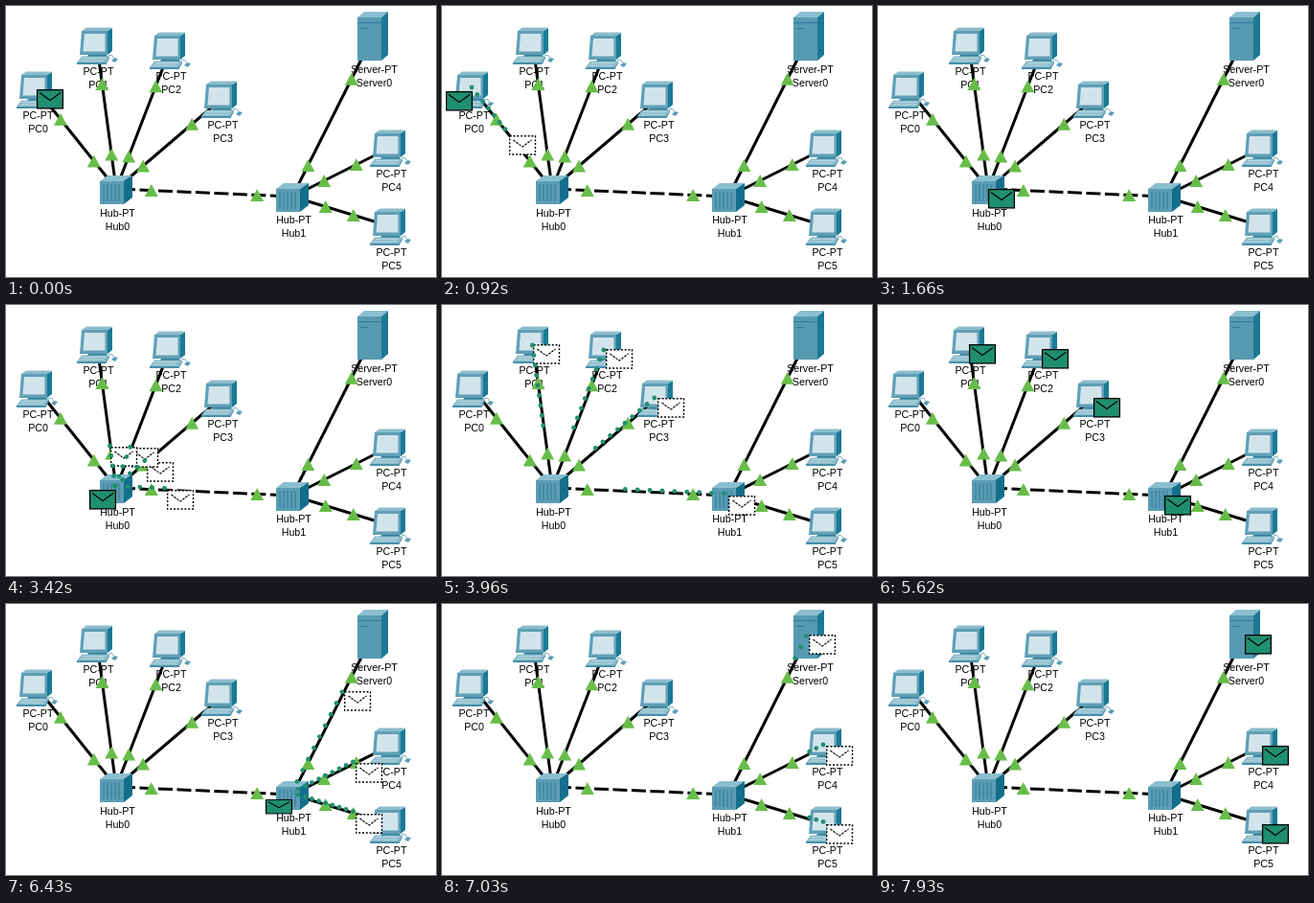
Write an HTML page that moves like this. It is 449 px wide and 283 px high and loops after 8 s.

```html
<!DOCTYPE html>
<html lang="en">
<head>
<meta charset="utf-8">
<title>Hub broadcast</title>
<style>
html, body { margin: 0; width: 100%; height: 100%; overflow: hidden; background: #fff; }
svg { display: block; width: 449px; height: 283px; }
text { font: 10.67px "Liberation Sans", Arial, sans-serif; text-anchor: middle; fill: #000; }
</style>
</head>
<body>
<svg viewBox="0 0 449 283">
  <defs>
    <g id="pc">
      <path d="M12 11Q17 9 17 13" fill="none" stroke="#6fa9bd"/>
      <path d="M15 16L18 13L22 14L19 18Z" fill="#5a9db5"/>
      <path d="M-8 8H9L11 12H-10Z" fill="#2b7f99"/>
      <path d="M-21 18L-16 11.500H13L9 18Z" fill="#8dbccc"/>
      <path d="M-21 18H9L13 11.500V13.500L9.500 20H-21Z" fill="#4690aa"/>
      <path d="M-17 16H7M-15 13.500H9" stroke="#b9d8e2"/>
      <path d="M11 -15L16 -18V6L11 10Z" fill="#1a7a96"/>
      <path d="M-16 -15L-11 -18.500H16L11 -15Z" fill="#8bbccb"/>
      <path d="M-16 -15H11V10H-18Z" fill="#5f9fb6"/>
      <path d="M-13 -12H8.500V6.500H-14.500Z" fill="#d2e4eb"/>
    </g>
    <g id="hub">
      <path d="M-17 -8L-9 -14H17L8 -8Z" fill="#8abfd0"/>
      <path d="M8 -8L17 -14V9L8 16Z" fill="#146f8c"/>
      <rect x="-17" y="-8" width="25" height="24" fill="#5c9db5"/>
      <path d="M-13 -5V13M-9 -5V13M-5 -5V13M-1 -5V13M3 -5V13" stroke="#2e7a94"/>
    </g>
    <g id="server">
      <path d="M-16 -20L-9 -26H16L9 -20Z" fill="#8abfd0"/>
      <path d="M9 -20L16 -26V19L9 25Z" fill="#1d7893"/>
      <rect x="-16" y="-20" width="25" height="45" fill="#569ab1"/>
      <path d="M-16 -14.500H9M-13 -8.500H-5" stroke="#2e7a94"/>
    </g>
    <g id="mail" stroke="#000">
      <rect x=".6" y=".6" width="26.800" height="19.300" fill="#1f8f70" stroke-width="1.300"/>
      <path d="M3 3.500L14 11.500L25 3.500" fill="none" stroke-width="1.200"/>
    </g>
    <g id="ghost" stroke="#000" fill="#fff">
      <rect x=".7" y=".7" width="26.800" height="19.300" stroke-width="1.400" stroke-dasharray="2 1.800"/>
      <path d="M4.500 5L14 12L23.500 5" fill="none" stroke-width="1.200" stroke-dasharray="2.500 1.200"/>
    </g>
    <g id="cross" fill="none" stroke-linecap="round">
      <path d="M5.500 4Q12 8 16.500 13.500M17 3.500Q10 7 6 13.500" stroke="#200" stroke-width="5"/>
      <path d="M5.500 4Q12 8 16.500 13.500M17 3.500Q10 7 6 13.500" stroke="#f4502a" stroke-width="3.200"/>
    </g>
  </defs>
  <g id="scene"></g>
  <g id="traffic"></g>
</svg>
<script>
const LOOP = 8000;

// name: [icon, x, y, label offset, model]
const nodes = {
  PC0: ['pc', 32, 87, 31, 'PC-PT'],
  PC1: ['pc', 95, 41, 31, 'PC-PT'],
  PC2: ['pc', 171, 46, 31, 'PC-PT'],
  PC3: ['pc', 225, 97, 31, 'PC-PT'],
  PC4: ['pc', 401, 148, 31, 'PC-PT'],
  PC5: ['pc', 401, 230, 31, 'PC-PT'],
  Server0: ['server', 383, 32, 38, 'Server-PT'],
  Hub0: ['hub', 115, 191, 29, 'Hub-PT'],
  Hub1: ['hub', 299, 199, 28, 'Hub-PT']
};

// from, to, positions of the two link lights along the cable
const links = [
  ['PC0', 'Hub0', .3, .72],
  ['PC1', 'Hub0', .27, .76],
  ['PC2', 'Hub0', .26, .765],
  ['PC3', 'Hub0', .28, .745],
  ['Hub0', 'Hub1', .2, .8],
  ['Server0', 'Hub1', .265, .805],
  ['PC4', 'Hub1', .345, .675],
  ['PC5', 'Hub1', .375, .66]
];

// moments at which the picture is refreshed
const spread = (from, to, n) => Array.from({ length: n }, (_, i) => from + (to - from) * i / (n - 1));
const ticks = [
  0, ...spread(500, 1510, 8), 1660,
  3420, 3540, 3690, 3810, 3960, 4080, 4230, 4360,
  4510, 4630, 4780, 4900, 5050, 5170, 5320, 5470,
  5620, 5740, 5890, 6010, 6160, 6280, 6430, 6580,
  6730, 6850, 7000, 7120, 7270, 7390, 7510, 7630, 7780, 7930
];

const SPEED = 1.4 / 1000;   // share of a cable per ms
const TRAIL = 450;          // life of a trail dot in ms
const GAP = .07;            // share of a cable between trail dots

// side: where the sender's own message waits (dx, dy, vertical scale)
const hops = [
  { show: 500, start: 460, end: 1660, from: 'PC0', to: ['Hub0'], drop: [], side: [-28, 2, 1] },
  { show: 3420, start: 3215, end: 4510, from: 'Hub0', to: ['Hub1', 'PC3', 'PC2', 'PC1'],
    drop: ['PC1', 'PC2', 'PC3'], side: [-28, 2, 1] },
  { show: 6010, start: 5970, end: 7120, from: 'Hub1', to: ['Server0', 'PC4', 'PC5'],
    drop: ['Server0', 'PC4'], side: [-28, 5, .75] }
];

const at = name => nodes[name].slice(1, 3);
const mix = (a, b, p) => [a[0] + (b[0] - a[0]) * p, a[1] + (b[1] - a[1]) * p];
const use = (id, [x, y], sy = 1) =>
  `<use href="#${id}" transform="translate(${Math.round(x)} ${Math.round(y)}) scale(1 ${sy})"/>`;

function drawScene() {
  let cables = '', icons = '', labels = '', lights = '';
  for (const [a, b, ...spots] of links) {
    const p = at(a), q = at(b);
    const dash = a === 'Hub0' ? ' stroke-dasharray="15 4.5" stroke-dashoffset="-5"' : '';
    cables += `<path d="M${p}L${q}" stroke="#000" stroke-width="3"${dash}/>`;
    for (const s of spots) {
      const [x, y] = mix(p, q, s);
      lights += `<path d="M${x} ${y - 6.5}l7 13h-14z" fill="#68bd4a"/>`;
    }
  }
  for (const [name, [icon, x, y, dy, model]] of Object.entries(nodes)) {
    icons += use(icon, [x, y]);
    labels += `<text x="${x + 1.5}" y="${y + dy}">${model}</text>` +
      `<text x="${x + 1.5}" y="${y + dy + 14}">${name}</text>`;
  }
  document.getElementById('scene').innerHTML = cables + icons + labels + lights;
}

function flight(hop, t) {
  const age = t - hop.start;
  const head = Math.min(1, age * SPEED);
  const tail = (age - TRAIL) * SPEED;
  const a = at(hop.from);
  let ghosts = '', dots = '';
  for (const name of hop.to) {
    const b = at(name);
    ghosts += use('ghost', mix(a, b, head));
    for (let p = 0; p <= head + .001; p += GAP) {
      if (p < tail) continue;
      const [x, y] = mix(a, b, p);
      dots += `<circle cx="${(x - 1).toFixed(1)}" cy="${(y - 2).toFixed(1)}" r="2.4" fill="#1f8f70"/>`;
    }
  }
  const [dx, dy, sy] = hop.side;
  const sender = head < 1 ? use('mail', [a[0] + dx, a[1] + dy], sy) : '';
  return ghosts + dots + sender;
}

function landed(hop, blink) {
  return hop.to.map(name => use('mail', at(name)) +
    (blink && hop.drop.includes(name) ? use('cross', at(name)) : '')).join('');
}

function traffic(i) {
  const t = ticks[i];
  const hop = hops.filter(h => t >= h.show).pop();
  if (!hop) return use('mail', at('PC0'));
  if (t < hop.end) return flight(hop, t);
  return landed(hop, (i - ticks.indexOf(hop.end)) % 2 === 1);
}

drawScene();
const layer = document.getElementById('traffic');
let last = -1;

function frame() {
  const t = performance.now() % LOOP;
  let i = ticks.length - 1;
  while (ticks[i] > t) i--;
  if (i !== last) {
    layer.innerHTML = traffic(i);
    last = i;
  }
  requestAnimationFrame(frame);
}
frame();
</script>
</body>
</html>
```
